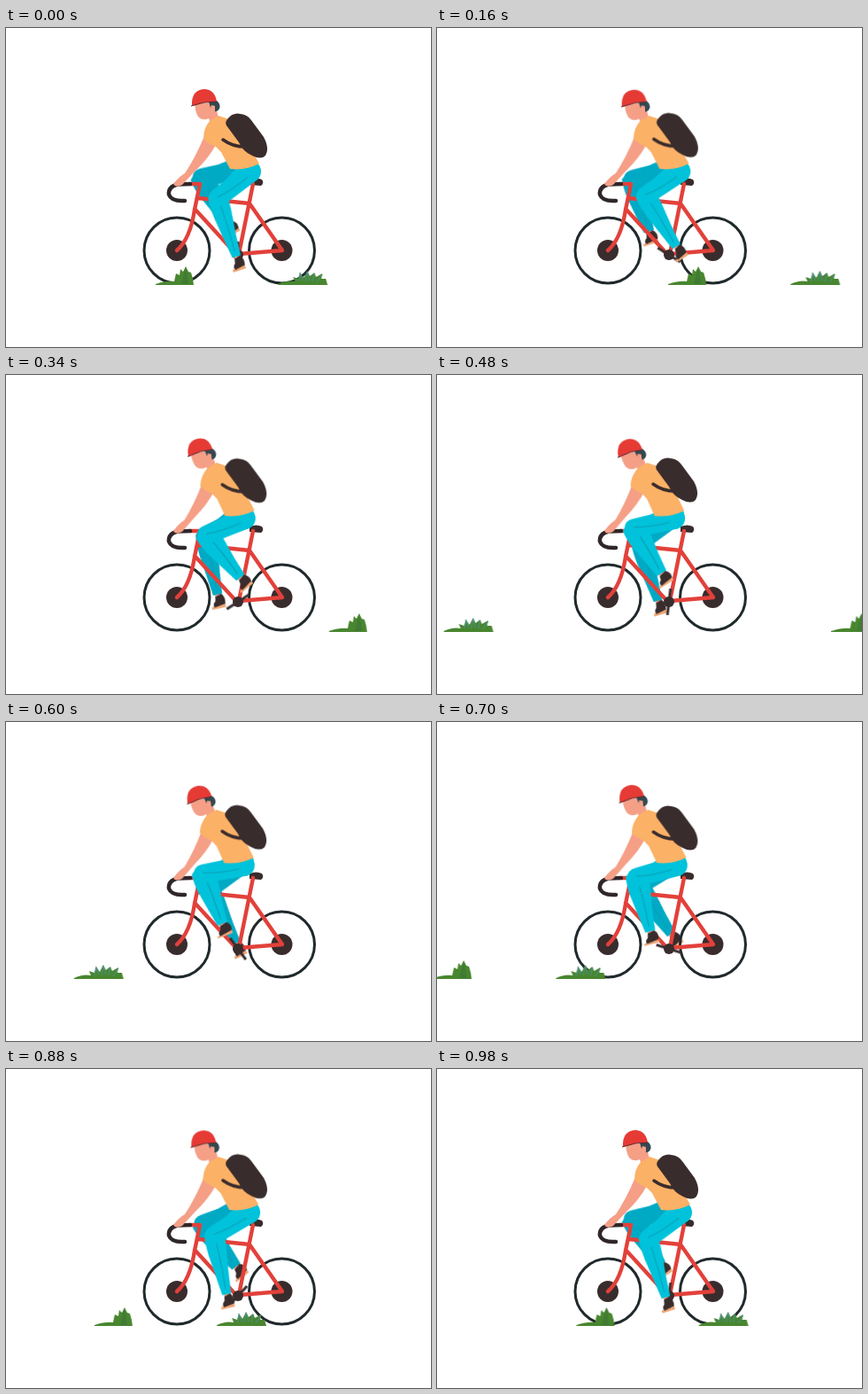
An HTML page without scripts for the animation above (1 s loop, 480 px wide and 360 px high).

```html
<!DOCTYPE html>
<html lang="en">
<head>
<meta charset="utf-8">
<title>Cyclist</title>
<style>
html, body { margin: 0; width: 100%; height: 100%; overflow: hidden; background: #fff; }
svg { display: block; width: 100%; height: 100%; }

.frame { fill: none; stroke: #e2413a; stroke-width: 4.4; stroke-linecap: round; stroke-linejoin: round; }
.dark { fill: #392c2d; }
.skin { fill: #f59f87; }
.fold { fill: none; stroke: #0a9fb4; stroke-width: 1; }

/* Upper body sways once per pedal turn */
.sway { animation: .5s ease-in-out infinite alternate; }
.head { animation-name: head; transform-origin: 225px 90px; }
.shirt { animation-name: shirt; }
.pack { animation-name: pack; }
.arm { animation-name: arm; transform-origin: 192px 177px; }
@keyframes head { to { transform: translate(-5px, 3px) rotate(-8deg); } }
@keyframes shirt { from { transform: translate(235px, 105px); } to { transform: translate(232px, 105px) skewX(-4.5deg); } }
@keyframes pack { to { transform: translate(-1px, -3px); } }
@keyframes arm { to { transform: rotate(-2.5deg); } }

/* Hip, knee and crank; the far leg runs half a turn behind */
.leg { --lag: 0s; fill: #00c2da; }
.far { --lag: -.5s; fill: #00a9c4; }
.hip { animation: hip .5s ease-in-out infinite alternate; }
.thigh { animation: thigh 1s linear var(--lag) infinite; }
.shin { animation: shin 1s linear var(--lag) infinite; }
.bend { animation: bend .5s ease-in-out var(--lag) infinite alternate; }
.crank { animation: crank 1s linear infinite; transform-origin: 262px 256px; }
@keyframes hip { from { transform: translate(276px, 162px); } to { transform: translate(268px, 162px); } }
@keyframes thigh {
  0%, 100% { transform: rotate(52.1deg); }
  10% { transform: rotate(53deg); }
  20% { transform: rotate(58deg); }
  30% { transform: rotate(65deg); }
  40% { transform: rotate(73deg); }
  50% { transform: rotate(79deg); }
  60% { transform: rotate(80deg); }
  70% { transform: rotate(75deg); }
  80% { transform: rotate(66deg); }
  90% { transform: rotate(56.9deg); }
}
@keyframes shin {
  0%, 100% { transform: translateY(48px) rotate(-70.5deg); }
  10% { transform: translateY(48px) rotate(-79.9deg); }
  20% { transform: translateY(48px) rotate(-93deg); }
  30% { transform: translateY(48px) rotate(-105deg); }
  40% { transform: translateY(48px) rotate(-111deg); }
  50% { transform: translateY(48px) rotate(-110deg); }
  60% { transform: translateY(48px) rotate(-102deg); }
  70% { transform: translateY(48px) rotate(-90deg); }
  80% { transform: translateY(48px) rotate(-78deg); }
  90% { transform: translateY(48px) rotate(-69.8deg); }
}
@keyframes bend { to { transform: scale(1.22, .87); } }
@keyframes crank { to { transform: rotate(-360deg); } }

.grass { fill: #48862f; animation: grass 1s steps(50) infinite; }
.tall { animation-delay: -.46s; }
.bushy { animation-delay: -.7s; }
@keyframes grass { from { transform: translateX(-96px); } to { transform: translateX(480px); } }
</style>
</head>
<body>
<svg viewBox="0 0 480 360">
  <defs>
    <g id="wheel">
      <circle r="37" fill="none" stroke="#20292c" stroke-width="3"/>
      <circle class="dark" r="12"/>
    </g>
    <path id="thigh" d="M-13 -7Q-14 8 -10 26L-9.500 46Q-9 57 1 57Q10 56 11.500 46L12 2Q10 -12 -2 -12Q-10 -12 -13 -7Z"/>
    <path id="shin" d="M-9.500 -3Q-11 8 -10 22L-5 70L5 70Q7 45 10.500 22Q13 6 10 -4Q0 -12 -9.500 -3Z"/>
    <g id="foot">
      <path class="skin" d="M-3 67H4V75H-3Z"/>
      <path fill="#f0a777" d="M-9 83L6 81V86H-9Z"/>
      <path class="dark" d="M-3 72L4 70Q8 75 6 82L-6 84Q-8 80 -4 77Z"/>
    </g>
  </defs>

  <g class="leg far">
    <g transform="translate(267 159)"><g class="thigh">
      <g class="shin"><g class="bend">
        <use href="#foot"/><use href="#shin"/><path class="fold" d="M1 4Q1 30 0 62"/>
      </g></g>
      <use href="#thigh"/>
    </g></g>
  </g>

  <use href="#wheel" x="193" y="251"/>
  <use href="#wheel" x="311.5" y="251"/>
  <path class="dark" d="M275 171Q283 168 289 171Q292 175 288 178L275 177Z"/>
  <path class="frame" d="M208 176H219L213 205Q208 238 193 251M213 204L258 253M217 192L275 198M279 176L263 255L312 251L275 198"/>
  <path d="M208 176L194 176.500Q183 179 184 188Q187 196 202 195" fill="none" stroke="#2f2729" stroke-width="4.500" stroke-linecap="round"/>
  <circle class="dark" cx="262" cy="256" r="6"/>
  <path class="crank" d="M262 241V271" stroke="#392c2d" stroke-width="3"/>

  <g class="leg">
    <g class="hip"><circle r="12"/><g class="thigh">
      <g class="shin"><g class="bend">
        <use href="#foot"/><use href="#shin"/><path class="fold" d="M1 2Q2 30 0 64"/>
      </g></g>
      <use href="#thigh"/><path class="fold" d="M3 6Q4 28 0 47"/>
    </g></g>
  </g>

  <path class="skin sway arm" d="M224 122L237 132Q228 148 214 161L199 177Q192 181 189 176Q195 168 202 164Q214 146 224 122Z"/>
  <g class="sway head">
    <path class="skin" d="M213 85Q214 97 218 101Q223 105 229 102L231 108L240 102L236 84Z"/>
    <path d="M229 83L238 82Q243 86 241 91Q239 95 236 94L236 88L232 87L231 90Z" fill="#344850"/>
    <path d="M210 88Q209 69 225 69Q236 70 238 83L224 84Z" fill="#e63a35"/>
    <path d="M209 88L224 84L238 83" fill="none" stroke="#5b2b30" stroke-width="1"/>
  </g>
  <g class="sway shirt">
    <path d="M-5 0L5 -6L17 -2Q34 18 43 34L51 48Q36 56 18 54L8 35L2 29Q-6 26 -12 20Q-12 8 -5 0Z" fill="#fbb166"/>
  </g>
  <g class="sway pack">
    <path class="dark" d="M250 103Q256 95 265 97Q273 98 277 104L291 123Q298 136 293 144Q288 149 278 144Q267 139 263 129L249 110Q247 106 250 103Z"/>
    <path d="M245 126Q257 135 274 134" fill="none" stroke="#392c2d" stroke-width="3.500" stroke-linecap="round"/>
  </g>

  <g class="grass tall">
    <path d="M0 289Q12 285 21 286L23 277L27 279L28 272L31 275L34 269L37 275L40 276L42 283L43 290H0Z"/>
    <path d="M29 289L34 270L37 289Z" fill="#417a35"/>
  </g>
  <g class="grass bushy">
    <path d="M0 289Q10 284 19 286L17 281L23 283L25 276L29 282L33 274L36 280L41 276L43 281L50 277L49 283L54 283L56 290H0Z"/>
    <path d="M23 286L25 277L28 285M31 286L33 275L36 285M39 286L41 277M44 287L50 278" fill="none" stroke="#4c8f86" stroke-width="1.200"/>
  </g>
</svg>
</body>
</html>
```
